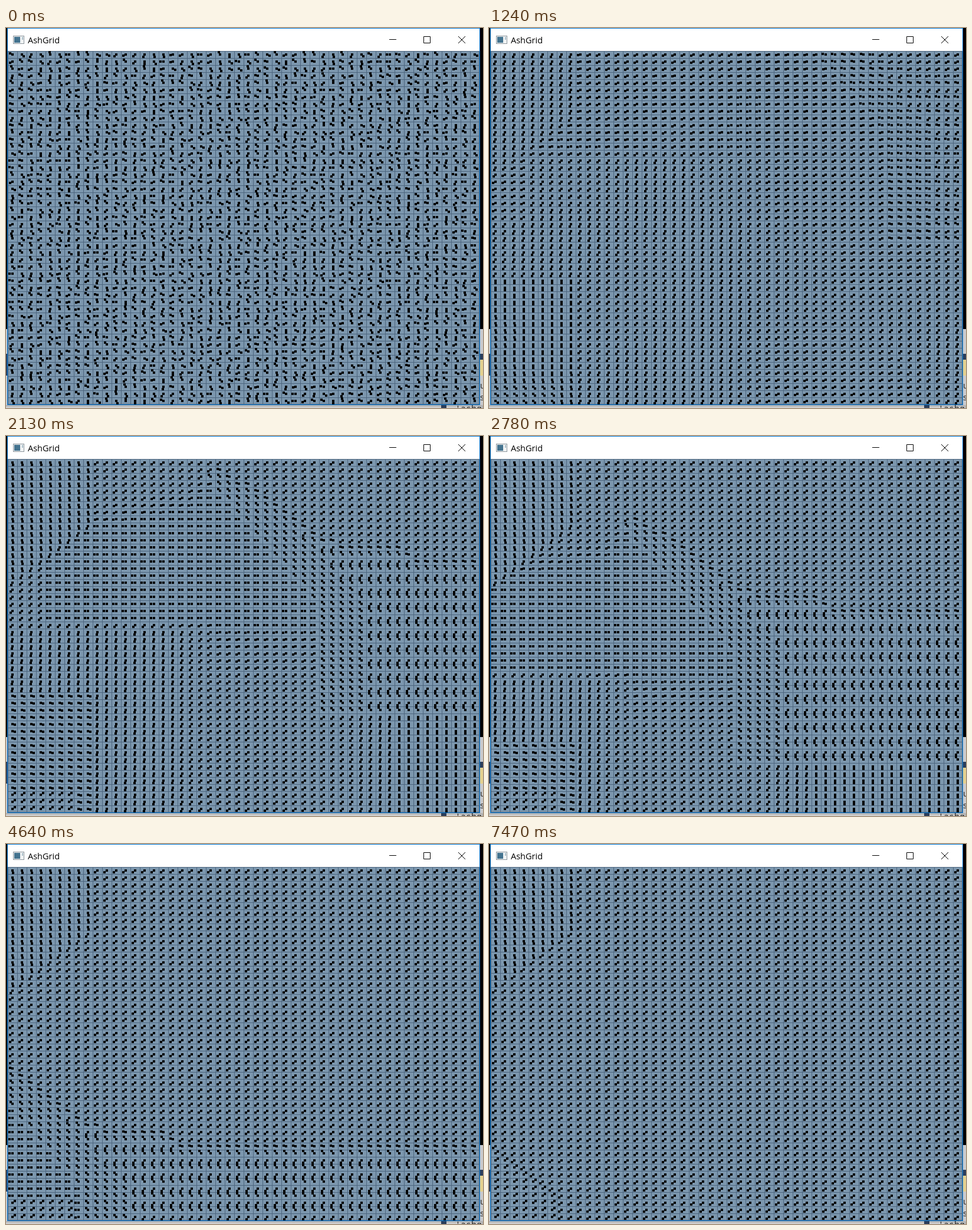
Animation of 809 by 645 pixels, one loop 7540 ms. Source, as an HTML page with a canvas:

```html
<!DOCTYPE html>
<html lang="en">
<head>
<meta charset="utf-8">
<title>AshGrid</title>
<style>
html, body { margin: 0; width: 100%; height: 100%; overflow: hidden; background: #000; }
canvas { display: block; }
</style>
</head>
<body>
<canvas id="stage" width="809" height="645"></canvas>
<script>
const ctx = document.getElementById('stage').getContext('2d');
const N = 50, CW = 16, CH = 12, LEFT = 3, TOP = 39, LOOP = 7540;

// Bursts of evenly spaced steps: start, end, count
const bursts = [
  [0, 80, 2], [260, 460, 3], [630, 820, 3], [1010, 1100, 2], [1240, 1670, 6],
  [1850, 2600, 9], [2690, 3050, 5], [3240, 3980, 9], [4080, 4360, 4],
  [4540, 5290, 9], [5390, 5570, 3], [5750, 6420, 8], [6510, 6780, 4], [6980, 7470, 6]
];
const times = bursts.flatMap(([a, b, n]) =>
  Array.from({ length: n }, (_, i) => Math.round((a + (b - a) * i / (n - 1)) / 10) * 10));

const clamp = v => Math.max(0, Math.min(1, v));
const mix = (a, b, k) => a + (b - a) * clamp(k);

let seed = 7;
function random() {
  seed = (seed * 1664525 + 1013904223) >>> 0;
  return seed / 4294967296;
}

// Edge of the settled wind, in coordinates that drift with it
const edge = [[-99, 14], [2, 13.5], [12, 11], [14.8, 7.2], [20, 11.7], [27, 18], [34, 18.8], [36.7, 21], [999, 21]];
function edgeAt(x) {
  const i = edge.findIndex(p => p[0] > x);
  const [x0, y0] = edge[i - 1], [x1, y1] = edge[i];
  return mix(y0, y1, (x - x0) / (x1 - x0));
}

// Wind that drifts one cell left and one cell down per step
function drifting(x, y) {
  const e = edgeAt(x);
  if (y < e) return 217;
  if (x > 14 && y < e + 1) return 165;
  const calm = Math.min(26, 15 + (y - 11) / 1.5);
  if (x < calm) {
    if (y < 29) return mix(210, 180, (y - e) / 3);
    return mix(180, mix(262, 217, (x - 9) / 5), (y - 29) / (x > 14 ? 8 : 2));
  }
  if (y > 42) return mix(217, 264, (x - 26) / 8);
  if (x < calm + 5) return 135;
  return y % 2 ? 236 : 124;
}

// Wind angle in degrees, counter-clockwise from right
function windAngle(c, r, step) {
  if (c <= 8 && c + r <= 16) return 280;
  if (c <= 8 && c + r === 17) return mix(262, 217, step / 72);
  if (c <= Math.min(6, r - 40) && (r > 46 || step > 44)) return 37;
  if (c < 9 && r > Math.max(31, step + 13)) return 345;
  if (c < 4 && r < 24 && step < 24) return 225;
  return drifting(c + step - 26, r - step + 26);
}

const unit = (x, y) => {
  const d = Math.hypot(x, y) || 1;
  return [x / d, y / d];
};
const polar = deg => [Math.cos(deg * Math.PI / 180), Math.sin(deg * Math.PI / 180)];

function smooth(field) {
  return field.map((_, i) => {
    const c = i % N, r = Math.floor(i / N);
    let x = 0, y = 0;
    for (let b = Math.max(0, r - 1); b <= Math.min(N - 1, r + 1); b++)
      for (let a = Math.max(0, c - 1); a <= Math.min(N - 1, c + 1); a++) {
        x += field[b * N + a][0];
        y += field[b * N + a][1];
      }
    return unit(x, y);
  });
}

// Random winds, mostly down and left, even out and give way to the drifting pattern
let noise = Array.from({ length: N * N }, () => polar(95 + random() * 240));
const fields = times.map((_, step) => {
  if (step && step < 19) noise = smooth(noise);
  const w = clamp((step - 3) / 14);
  return noise.map((v, i) => {
    const p = polar(windAngle(i % N, Math.floor(i / N), step));
    return unit(mix(v[0], p[0], w), mix(v[1], p[1], w));
  });
});

function rect(color, x, y, w, h) {
  ctx.fillStyle = color;
  ctx.fillRect(x, y, w, h);
}
function text(str, x, y, font, color) {
  ctx.font = font;
  ctx.fillStyle = color;
  ctx.fillText(str, x, y);
}

function drawDesktop() {
  rect('#000', 0, 0, 809, 645);
  rect('#c9cacd', 0, 511, 809, 134);
  rect('#2b3d59', 0, 553, 809, 10);
  rect('#e3d08f', 804, 563, 5, 27);
  rect('#2b3d59', 0, 563, 2, 27);
  const shade = ctx.createLinearGradient(0, 640, 0, 645);
  shade.addColorStop(0, '#a9a9a9');
  shade.addColorStop(1, '#d8d8d8');
  rect(shade, 0, 640, 809, 5);
  rect('#2b3d59', 738, 640, 9, 5);
  const mono = '15px "Noto Sans Mono", monospace';
  text('u', 804, 612, mono, '#333');
  text('s', 803, 632, mono, '#333');
  text("'ashgr", 762, 651, mono, '#222');
}

function drawWindow() {
  rect('#0078d7', 2, 0, 802, 640);
  rect('#fff', 3, 1, 800, 38);
  rect('#8c959c', 12, 13, 19, 14);
  rect('#f1f3f4', 13, 14, 17, 12);
  rect('#44738f', 14, 15, 10, 10);
  rect('#a9bfca', 27, 15, 2, 5);
  text('AshGrid', 37, 26, '14.5px "Open Sans", "Noto Sans", sans-serif', '#000');
  ctx.strokeStyle = '#000';
  ctx.lineWidth = 1;
  ctx.beginPath();
  ctx.moveTo(650, 19.5);
  ctx.lineTo(662, 19.5);
  ctx.rect(708.5, 14.5, 11, 11);
  ctx.moveTo(767, 14);
  ctx.lineTo(779, 26);
  ctx.moveTo(779, 14);
  ctx.lineTo(767, 26);
  ctx.stroke();
}

function drawGrid(field) {
  rect('#7c97ae', LEFT, TOP, N * CW, N * CH);
  for (let i = 0; i <= N; i++) {
    rect('#4c657e', LEFT + Math.min(i * CW, N * CW - 1), TOP, 1, N * CH);
    rect('#4c657e', LEFT, TOP + Math.min(i * CH, N * CH - 1), N * CW, 1);
  }
  field.forEach(([vx, vy], i) => {
    const x = LEFT + (i % N) * CW + 6, y = TOP + Math.floor(i / N) * CH + 4;
    rect('#000', x, y, 4, 4);
    rect('#000', x + Math.round(vx * 4.6), y - Math.round(vy * 4.4), 4, 4);
  });
}

let shown = -1;
function tick() {
  const t = performance.now() % LOOP;
  const step = times.filter(s => s <= t).length - 1;
  if (step !== shown) {
    drawGrid(fields[step]);
    shown = step;
  }
  requestAnimationFrame(tick);
}

drawDesktop();
drawWindow();
tick();
</script>
</body>
</html>
```
